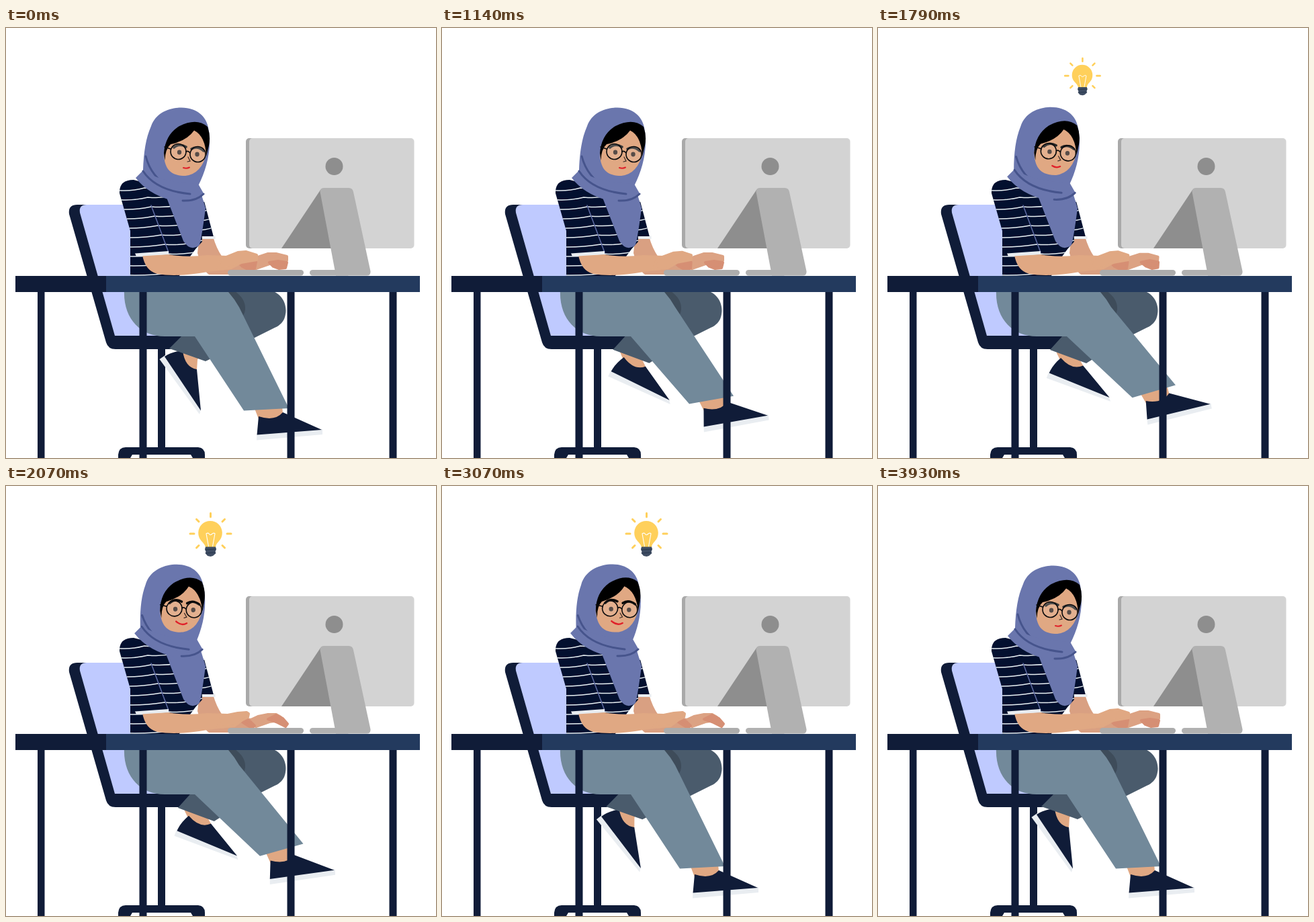
An HTML page for the animation above (4 s loop, 640 px wide and 640 px high).

```html
<!DOCTYPE html>
<html lang="en">
<head>
<meta charset="utf-8">
<title>Idea at the desk</title>
<style>
html, body { margin: 0; width: 100%; height: 100%; overflow: hidden; background: #fff; }
svg { display: block; width: 100vw; height: 100vh; }
.navy { fill: #101c38; }
.shirt { fill: #03102f; }
.skin { fill: #e0a883; }
.far { fill: #d9a082; }
.scarf { fill: #6a76ad; }
.sole { fill: #e9edf1; }
.line { fill: none; stroke-linecap: round; }
.hand { stroke-width: 4; stroke-linejoin: round; }
.stripes { fill: none; stroke: #e8eef2; stroke-width: 1.5; }
</style>
</head>
<body>
<svg viewBox="0 0 640 640">
  <defs>
    <clipPath id="bodyClip"><use href="#torso"/></clipPath>
    <clipPath id="sleeveClip"><use href="#farSleeve"/></clipPath>
  </defs>

  <!-- chair -->
  <path class="navy" d="M94 277Q92 263 106 263H130L185 458H290V478H163Q152 478 149 468Z"/>
  <path fill="#bfcaff" d="M110 275Q108 263 120 263H200V458H162Z"/>
  <path fill="#bfcaff" d="M180 380H260V458H180Z"/>
  <rect class="navy" x="226" y="476" width="11" height="152"/>
  <path class="navy" d="M167 640V635Q168 624 178 624H286Q296 625 296 635V640H278L275 635H188L185 640Z"/>

  <!-- lower body -->
  <g id="backFoot">
    <path class="skin" d="M262 470L292 476 285 494 284 509 268 504 260 484Z"/>
    <path class="sole" d="M237 487L228.500 493 288 575 290.500 566Z"/>
    <path class="navy" d="M236 489Q246 482 263 480Q266 505 284 508L290 569.500Z"/>
  </g>
  <path id="backLeg" fill="#4a5b6c"/>
  <path fill="#3e4c5a" d="M320 390H338Q357 402 356 419Q355 431 344 434Z"/>
  <g id="frontFoot">
    <path class="skin" d="M366 556L410 554 412 573 396 590 376 582Z"/>
    <path class="sole" d="M373.500 604L373 613.500 471 605 471 597Z"/>
    <path class="navy" d="M376 578Q400 586 412 572L470 598 373.500 605.500Z"/>
  </g>
  <path id="frontLeg" fill="#72899a"/>

  <!-- monitor -->
  <rect x="357" y="164" width="60" height="164" rx="5" fill="#a9a9a9"/>
  <rect x="362" y="164" width="245.500" height="164" rx="5" fill="#d3d3d3"/>
  <circle cx="488.500" cy="206" r="13" fill="#8e8e8e"/>
  <path fill="#8e8e8e" d="M468 241L410 328H490Z"/>
  <rect x="452" y="360" width="60" height="8.500" rx="4.200" fill="#b1b1b1"/>
  <path fill="#b1b1b1" d="M467.500 244Q467 238 474 238H510Q516 238 517 244L542.500 362Q543 368.500 537 368.500H491Z"/>

  <!-- torso and arms -->
  <path class="far" d="M288 308L308 310Q313 328 322 341L366 346 366 360 330 367H302Q292 360 285 335Z"/>
  <path id="farSleeve" class="shirt" d="M284 255L295 258 309 311 284 311Z"/>
  <g id="farStripes" class="stripes" clip-path="url(#sleeveClip)"></g>
  <path class="sole" d="M289 310H311.500V314H289Z"/>
  <path id="torso" class="shirt" d="M169 246Q168 226 190 226L225 235 290 262 292 318Q272 338 258 369H185V302Z"/>
  <g id="stripes" class="stripes" clip-path="url(#bodyClip)"></g>
  <path class="line" stroke="#5c689f" stroke-width="1.600" d="M216 264L242 334"/>
  <path class="skin" d="M203 338L242 337Q268 342 300 338L330 339 334 359 300 363Q255 371 225 366Q207 361 203 338Z"/>
  <path class="sole" d="M192 335.500L242 332V337L194 340Z"/>

  <!-- scarf tail, head, neck wrap -->
  <path class="scarf" d="M238 250L264 317Q274 333 287 324Q290 322 297 268L290 245Z"/>
  <g id="head">
    <path class="scarf" d="M204 225V211C205 185 208 164 216 146C223 126 243 118.500 261 118.500C285 119 298 132 301 148C307 178 299 210 286 235L260 250Z"/>
    <path class="skin" d="M235 185C235 210 245 220 267 220Q292 217 299 184Q300 155 279 150Q245 155 235 185Z"/>
    <path d="M235 186Q237 159 258 146Q284 133 300 147Q305 161 302 175L298 191Q297 161 280 152.500Q269 168 245 173Q237 180 236.500 197Z"/>
    <path class="line" stroke="#46548c" stroke-width="3" d="M208 191Q216 222 244 237"/>
    <g id="brows" class="line" stroke-width="3.500">
      <path d="M250 178Q258 171 268 177"/>
      <path d="M276 180Q285 175 294 183"/>
    </g>
    <g class="line" stroke="#0a0a0c" stroke-width="1.600">
      <circle cx="256.500" cy="184" r="11.500" fill="#fff" fill-opacity=".1"/>
      <circle cx="285.500" cy="188" r="11.500" fill="#fff" fill-opacity=".1"/>
      <path d="M268 184Q271 182 274 186M245 180L236 177"/>
    </g>
    <g fill="#574c48">
      <ellipse id="eyeL" cx="258" cy="185" rx="3.200"/>
      <ellipse id="eyeR" cx="284.500" cy="188" rx="3.200"/>
    </g>
    <path class="line" stroke="#3a2a26" stroke-width="1.200" d="M271 192L274 198 270 199"/>
    <path id="mouth" class="line" stroke="#e0202a"/>
  </g>
  <g id="wrap">
    <path class="scarf" d="M193 223L204 212Q225 226 262 230L286 232 294 246Q288 262 262 260Q215 252 193 223Z"/>
    <path class="line" stroke="#46548c" stroke-width="3" d="M204 213Q223 242 274 247M263 257Q283 258 294 247"/>
  </g>

  <!-- hands and keyboard -->
  <g class="hand">
    <path id="farPalm" fill="#dca283" stroke="#dca283"/>
    <path id="farTips" fill="#d68f74" stroke="#d68f74"/>
    <path id="nearTips" fill="#d68f74" stroke="#d68f74"/>
    <path id="nearPalm" fill="#e0a883" stroke="#e0a883"/>
  </g>
  <rect x="330" y="360" width="113" height="8.500" rx="4.200" fill="#acacac"/>

  <!-- desk -->
  <path class="navy" d="M47 392H57.500V640H47ZM198.500 392H209.500V640H198.500ZM418.500 392H429.500V640H418.500ZM570.500 392H581.500V640H570.500Z"/>
  <rect class="navy" x="14" y="369" width="136" height="24"/>
  <rect fill="#233a5e" x="149" y="369" width="467" height="24"/>

  <!-- bulb -->
  <g id="bulb">
    <path class="line" stroke="#ffd05b" stroke-width="3" d="M304.500 40.500V46M283.500 49.500L287 53M325.500 49.500L322 53M274 71H280M329 71H335M283.500 92L287 88.500M325.500 92L322 88.500"/>
    <path fill="#ffd05b" d="M297 91Q296 87 291 82A17.800 17.800 0 1 1 317 82Q312 87 312 91Z"/>
    <path class="line" stroke="#fff" stroke-width="1.100" d="M301.500 90L298 71Q301 69 302.500 71.500T306.500 71.500 311 71L307.500 90"/>
    <path fill="#3f4d63" d="M297 90.500H312L313 94 311.500 98 312.500 100 308 104 304.500 105 300 104 296.500 100 297.500 98 296 94Z"/>
    <path class="line" stroke="#27364d" d="M297 95L312 94M298 100L311 99"/>
  </g>
</svg>
<script>
const LOOP = 4000;
const el = id => document.getElementById(id);
const set = (id, key, val) => el(id).setAttribute(key, val);
const mix = (a, b, k) => a + (b - a) * k;
const part = (t, a, b) => Math.min(1, Math.max(0, (t - a) / (b - a)));
const smooth = p => p * p * (3 - 2 * p);
const cubic = p => p < .5 ? 4 * p ** 3 : 1 - 4 * (1 - p) ** 3;
const settle = p => Math.sin(p * Math.PI / 2);
const wave = (t, period) => (1 - Math.cos(2 * Math.PI * t / period)) / 2;

// each hand part: curled pose, stretched pose
const hands = {
  nearPalm: [
    [320,344, 345,334, 357,333, 373,338, 373,345, 350,349, 335,357, 315,359],
    [320,343, 345,338, 358,337, 361,339, 360,344, 352,348, 340,357, 315,359]],
  nearTips: [
    [347,350, 362,347, 372,348, 370,358, 360,359, 352,355],
    [346,347, 354,344, 364,351, 370,357, 366,360, 356,354]],
  farPalm: [
    [360,350, 375,341, 390,336, 402,336, 418,340, 418,346, 395,350, 372,358],
    [360,350, 375,343, 390,340, 402,340, 409,344, 406,349, 392,351, 372,358]],
  farTips: [
    [392,349, 405,347, 418,349, 416,357, 406,358, 398,355],
    [390,347, 402,341, 412,346, 419,354, 416,358, 402,351]]
};

function pose(id, k) {
  const [a, b] = hands[id];
  set(id, 'd', 'M' + a.map((v, i) => mix(v, b[i], k).toFixed(2)).join(' ') + 'Z');
}

function turn(x, y, deg, cx, cy) {
  const r = deg * Math.PI / 180, c = Math.cos(r), s = Math.sin(r);
  return [cx + (x - cx) * c - (y - cy) * s, cy + (x - cx) * s + (y - cy) * c];
}

function addStripes() {
  let near = '', far = '';
  for (let i = 0; i < 10; i++) {
    const y = 241 + i * 14;
    const seam = 206 + i * 5;
    near += `<path d="M162 ${y}Q${(162 + seam) / 2} ${y + 3} ${seam} ${y - 3}Q${seam + 35} ${y} ${seam + 70} ${y - 14}"/>`;
    far += `<path d="M284 ${y + 4}Q298 ${y + 4} 314 ${y - 2}"/>`;
  }
  el('stripes').innerHTML = near;
  el('farStripes').innerHTML = far;
}

function legs(t) {
  const back = cubic(part(t, 350, 1500)) - settle(part(t, 2060, 3480));
  set('backFoot', 'transform', `rotate(${-34 * back} 285.5 470.5)`);
  const ax = mix(243, 256, back), ay = mix(477, 479, back);
  const bx = mix(297, 310, back), by = mix(496, 499, back);
  set('backLeg', 'd', `M320 390H392C416 396 418 418 416 426Q414 440 400 446L370 461 ${bx} ${by} ${ax} ${ay} ${ax + 18} 459Z`);

  const front = -13.2 * (cubic(part(t, 650, 1600)) - smooth(part(t, 1980, 2940)));
  const ankle = 3 * smooth(part(t, 700, 1500)) + 6.4 * smooth(part(t, 1700, 2060))
    - 9.4 * smooth(part(t, 2070, 2800));
  set('frontFoot', 'transform', `rotate(${front} 283 454) rotate(${ankle} 363 529)`);
  const left = turn(354, 569.5, front, 283, 454), right = turn(421, 566, front, 283, 454);
  set('frontLeg', 'd', `M176 390C174 432 200 459 236 459H281L${left} ${right} 347 415.5Q340 403 331 393V390Z`);
}

function head(t) {
  const k = smooth(part(t, 1480, 2180)) - smooth(part(t, 3380, 3900));
  set('head', 'transform', `translate(${-3 * k} ${-k}) rotate(${-4 * k} 244 232)`);
  set('wrap', 'transform', `translate(${-2 * k} ${-4 * k})`);
  set('brows', 'transform', `translate(0 ${-2.7 * k})`);
  const tone = Math.round(mix(58, 8, k));
  set('brows', 'stroke', `rgb(${tone},${tone},${tone})`);
  set('mouth', 'd', `M${mix(264, 257.5, k)} ${mix(208, 203, k)}Q${mix(269, 265, k)} ${mix(209.5, 211, k)} ${mix(273, 273.5, k)} ${mix(207.5, 207, k)}`);
  set('mouth', 'stroke-width', mix(2, 2.5, k));
  const lid = Math.sin(Math.PI * part(t, 240, 390));
  for (const id of ['eyeL', 'eyeR']) set(id, 'ry', 3.4 - 2.9 * lid);
}

function bulb(t) {
  const size = smooth(part(t, 1600, 1850));
  const fade = 1 - part(t, 3390, 3600);
  set('bulb', 'transform', `translate(304 72) scale(${size}) translate(-304 -72)`);
  set('bulb', 'opacity', size > 0 ? fade : 0);
}

function typing(t) {
  let near = wave(Math.min(t, 2002), 364), far = wave(Math.min(t, 2002), 572);
  if (t > 3500) near = far = wave(3930 - Math.min(t, 3930), 860 / 3);
  pose('nearPalm', near);
  pose('nearTips', near);
  pose('farPalm', far);
  pose('farTips', far);
}

function draw(now) {
  const t = now % LOOP;
  legs(t);
  head(t);
  bulb(t);
  typing(t);
}

addStripes();
const start = performance.now();
function tick() {
  draw(performance.now() - start);
  requestAnimationFrame(tick);
}
tick();
</script>
</body>
</html>
```
